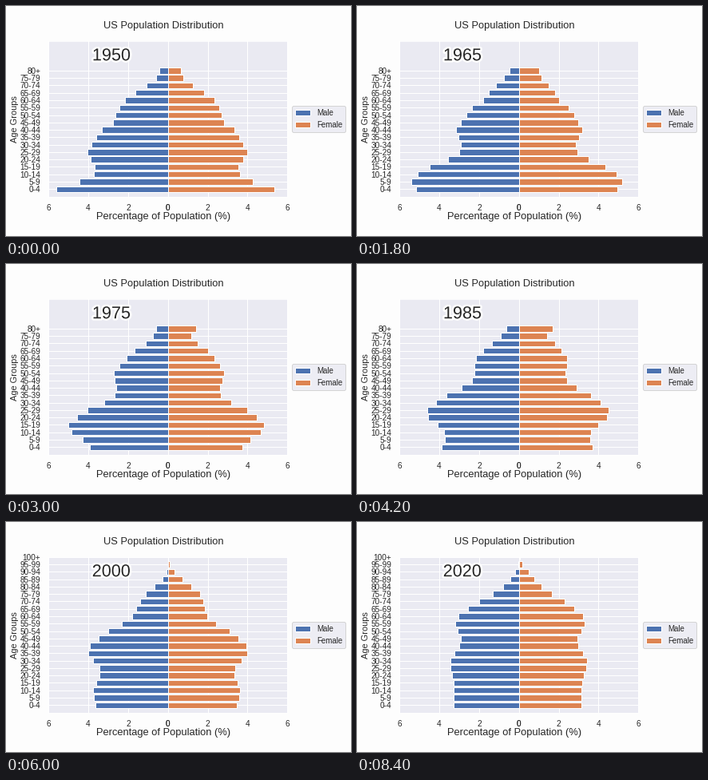
A matplotlib script that plays this animation: 432 by 288 pixels, repeating every 9000 ms.

```python
import numpy as np
import matplotlib.pyplot as plt
import matplotlib.patheffects as pe
from matplotlib.animation import FuncAnimation

W, H = 432, 288
BLUE, ORANGE = "#4C72B0", "#DD8452"
PANEL, INK = "#EAEAF2", "#262626"
LEFT, MID, RIGHT, TOP, BOTTOM = 53, 202.7, 352.3, 43.7, 238.6
GROUPS = 21
AGE = 5 * np.arange(GROUPS)

# Boys (millions) aged 0-4 at the turning points of the birth rate
BIRTHS = np.array([
    (1875, 3.6), (1890, 5.0), (1905, 4.9), (1910, 5.7), (1925, 6.6),
    (1935, 5.9), (1940, 6.0), (1945, 7.15), (1950, 8.95), (1955, 10.1),
    (1960, 10.7), (1965, 10.3), (1970, 9.2), (1975, 8.6), (1980, 8.75),
    (1990, 10.0), (1995, 10.2), (2005, 10.1), (2020, 10.85)]).T

plt.rcParams.update({
    "font.family": "Liberation Sans", "font.size": 10,
    "text.color": INK, "axes.labelcolor": INK,
    "xtick.color": INK, "ytick.color": INK,
    "axes.facecolor": PANEL, "axes.edgecolor": "white",
    "axes.axisbelow": True, "grid.color": "white", "grid.linewidth": 1,
})


def survival(t, extra=0):
    """Gompertz curve; t is years since 1950, extra the added lifespan."""
    span = 71.8 + .06 * t + .0012 * t * t + extra
    return np.exp(-np.exp((.085 + .00026 * t) * (AGE - span)))


def pyramid(year):
    """Male and female shares (%) of each age group."""
    t = year - 1950
    born = year - AGE
    migration = .15 * np.clip((born - 1955) / 15, 0, 1) * np.minimum(AGE / 30, 1)
    cohort = np.interp(born, *BIRTHS) * (1 + migration)
    women_gain = 2 + 4.2 * np.sin(np.pi * t / 90)
    male = cohort * survival(t)
    female = cohort * (.955 + .001 * AGE) * survival(t, women_gain)
    shares = 100 * np.array([male, female]) / (male + female).sum()
    if year < 1990:  # older tables end with an open 80+ group
        shares = np.column_stack([shares[:, :16], shares[:, 16:].sum(axis=1)])
    return shares


def age_labels(n):
    return [f"{a}-{a + 4}" for a in AGE[:n - 1]] + [f"{AGE[n - 1]}+"]


fig = plt.figure(figsize=(W / 72, H / 72), dpi=72, facecolor="#FDFDFD")


def panel(x0, x1, xlim, color, label):
    ax = fig.add_axes([x0 / W, 1 - BOTTOM / H, (x1 - x0) / W, (BOTTOM - TOP) / H])
    bars = ax.barh(range(GROUPS), np.zeros(GROUPS), height=.8, color=color,
                   edgecolor="white", linewidth=1, label=label)
    ax.set(xlim=xlim, ylim=(-1, GROUPS - 1), xticks=[0, 2, 4, 6])
    ax.tick_params(length=0, pad=9.5)
    ax.grid(True)
    return ax, bars


def put(x, y, text, size, va="baseline", **kw):
    return fig.text(x / W, 1 - y / H, text, fontsize=size, ha="center", va=va, **kw)


ax_m, bars_m = panel(LEFT, MID, (6, 0), BLUE, "Male")
ax_f, bars_f = panel(MID, RIGHT, (0, 6), ORANGE, "Female")
ax_f.tick_params(labelleft=False)

put(197.7, 28, "US Population Distribution", 12.85)
put(197.5, 267, "Percentage of Population (%)", 12.85)
put(11, 141.6, "Age Groups", 11, va="center", rotation=90)
year_text = put(132, 68.2, "", 21.6,
                path_effects=[pe.withStroke(linewidth=5, foreground="white")])
fig.legend(handles=[bars_m, bars_f], loc="center left", borderaxespad=0,
           bbox_to_anchor=(358 / W, 1 - 141.7 / H), fontsize=9.7,
           facecolor=PANEL, edgecolor="#CCCCCC", framealpha=.8)


def update(i):
    year = 1950 + 5 * i
    for ax, bars, shares in zip((ax_m, ax_f), (bars_m, bars_f), pyramid(year)):
        n = len(shares)
        for k, bar in enumerate(bars):
            bar.set_visible(k < n)
            bar.set_width(shares[k] if k < n else 0)
        ax.set_yticks(range(n), age_labels(n))
    year_text.set_text(str(year))
    return []


anim = FuncAnimation(fig, update, frames=15, interval=600, repeat=True,
                     repeat_delay=0, blit=False)
plt.show()
```
